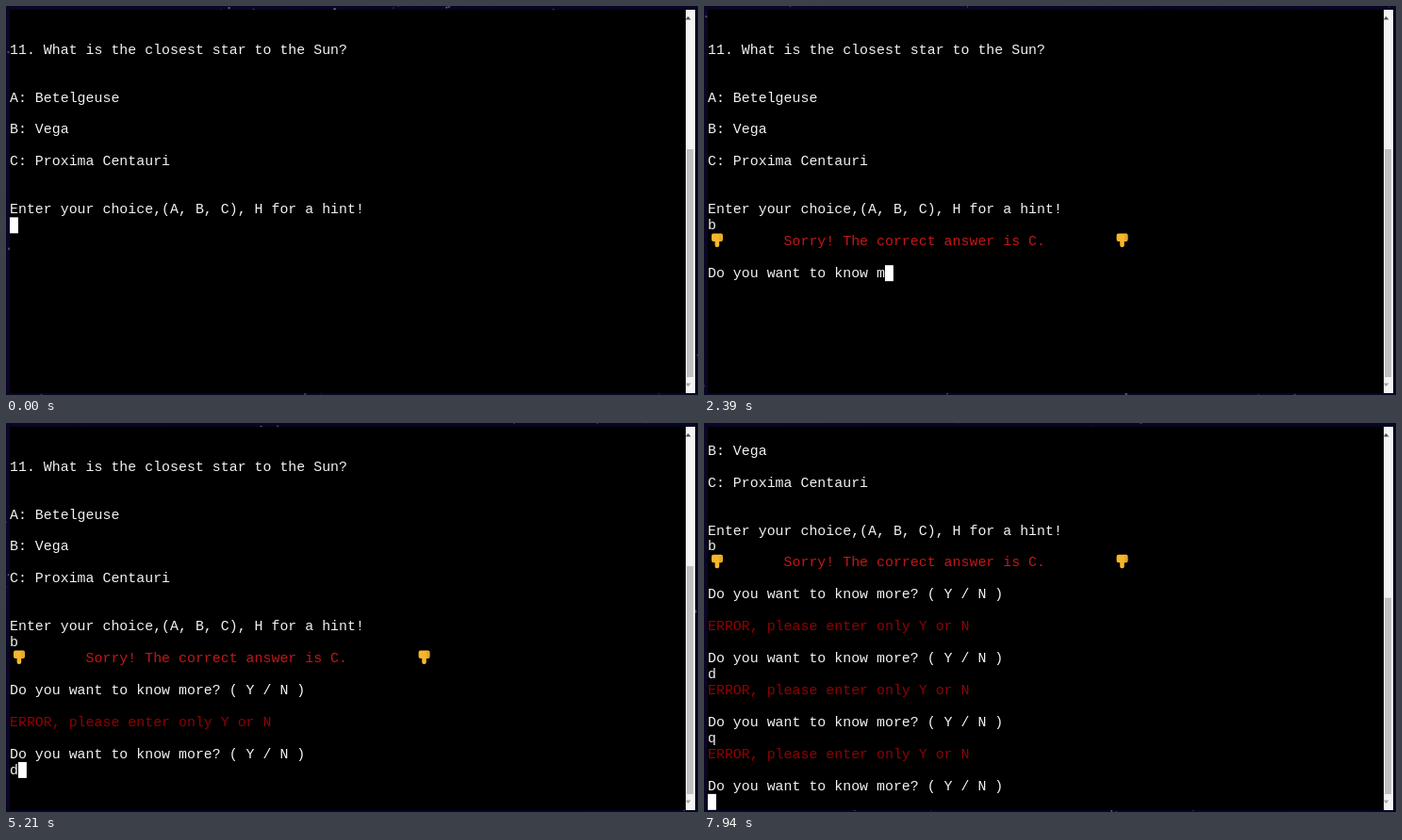
An HTML page with a canvas that plays this animation: 734x413 px, repeating every 8000 ms.

```html
<!DOCTYPE html>
<html lang="en">
<head>
<meta charset="utf-8">
<title>Quiz terminal</title>
<style>
html, body { margin: 0; width: 734px; height: 413px; overflow: hidden; background: #000; }
canvas { display: block; }
</style>
</head>
<body>
<canvas id="stage" width="734" height="413"></canvas>
<script>
const ctx = document.getElementById('stage').getContext('2d');
const W = 734, H = 413, LOOP = 8000;
const LEFT = 4, TOP = 4, CELL = 8.95, ROW = 16.95, ROWS = 24, CHAR_MS = 25;
const WHITE = '#f2f2f2', RED = '#c51616', DARK_RED = '#920000';
const ASK = 'Do you want to know more? ( Y / N )';
const ERROR = 'ERROR, please enter only Y or N';

const INTRO = ['', '', '11. What is the closest star to the Sun?', '', '',
  'A: Betelgeuse', '', 'B: Vega', '', 'C: Proxima Centauri', '', '',
  'Enter your choice,(A, B, C), H for a hint!'];

// key: when the answer is typed, enter: when it is sent
const TURNS = [
  { key: 1100, enter: 1850, answer: 'b', reply: 'Sorry! The correct answer is C.', color: RED, indent: 9, thumbs: true },
  { key: 3600, enter: 3680, answer: '', reply: ERROR, color: DARK_RED },
  { key: 4950, enter: 5275, answer: 'd', reply: ERROR, color: DARK_RED },
  { key: 6550, enter: 6870, answer: 'q', reply: ERROR, color: DARK_RED }
];

function screenLines(t) {
  const lines = INTRO.map(text => ({ text }));
  lines.push({ text: '' });
  for (const turn of TURNS) {
    if (t < turn.key) break;
    lines[lines.length - 1].text = turn.answer;
    if (t < turn.enter) break;
    lines.push({ text: turn.reply, color: turn.color, indent: turn.indent, thumbs: turn.thumbs });
    const count = Math.floor((t - turn.enter) / CHAR_MS);
    lines.push({ text: '' }, { text: ASK.slice(0, count) });
    if (count < ASK.length) break;
    lines.push({ text: '' });
  }
  return lines;
}

let seed = 11;
function rand() {
  seed = (seed * 16807) % 2147483647;
  return seed / 2147483647;
}
const stars = Array.from({ length: 900 }, () => ({
  angle: rand() * Math.PI * 2, dist: rand(), size: 0.5 + rand() * 1.1, light: 0.15 + rand() * 0.5
}));

function drawSky(t) {
  const g = ctx.createLinearGradient(0, 0, W, H);
  g.addColorStop(0, '#0b0526');
  g.addColorStop(0.5, '#090422');
  g.addColorStop(1, '#080525');
  ctx.fillStyle = g;
  ctx.fillRect(0, 0, W, H);
  for (const s of stars) {
    const d = (s.dist + t / 24000) % 1 * 430;
    ctx.fillStyle = `rgba(185,175,215,${s.light})`;
    ctx.beginPath();
    ctx.arc(W / 2 + Math.cos(s.angle) * d, H / 2 + Math.sin(s.angle) * d, s.size, 0, Math.PI * 2);
    ctx.fill();
  }
}

function triangle(x, y, dir, color) {
  ctx.fillStyle = color;
  ctx.beginPath();
  ctx.moveTo(x - 3, y + 1.5 * dir);
  ctx.lineTo(x + 3, y + 1.5 * dir);
  ctx.lineTo(x, y - 2 * dir);
  ctx.fill();
}

function drawScrollbar(scroll) {
  ctx.fillStyle = '#f3f3f3';
  ctx.fillRect(721, 4, 10, 407);
  ctx.fillStyle = '#c0c0c0';
  const y = 152 + scroll * 5.6;
  ctx.fillRect(722, y, 7, 394 - y);
  triangle(723.5, 13, 1, '#505050');
  triangle(723.5, 402, -1, '#a3a3a3');
}

function drawThumb(col, top) {
  const x = LEFT + col * CELL + 4, y = top + 0.2;
  ctx.fillStyle = '#f6b62c';
  ctx.beginPath();
  ctx.roundRect(x, y, 12, 8.5, 2);
  ctx.roundRect(x + 3.6, y + 5, 4.6, 9.5, 2);
  ctx.fill();
  ctx.fillStyle = '#c98a1e';
  for (let i = 0; i < 3; i++) ctx.fillRect(x + 8.4, y + 2 + i * 2.1, 3, 0.7);
}

function drawLine(line, top) {
  const indent = line.indent || 0;
  ctx.fillStyle = line.color || WHITE;
  [...line.text].forEach((c, i) => ctx.fillText(c, LEFT + (indent + i) * CELL, top + 12.8));
  if (line.thumbs) {
    drawThumb(0, top);
    drawThumb(48, top);
  }
}

function draw(t) {
  const lines = screenLines(t);
  const scroll = Math.max(0, lines.length - ROWS);
  drawSky(t);
  ctx.fillStyle = '#000';
  ctx.fillRect(LEFT, TOP, 717, 407);
  drawScrollbar(scroll);
  ctx.font = '14.92px "Liberation Mono", "Courier New", monospace';
  const rowTop = i => TOP + (i - scroll) * ROW;
  for (let i = scroll; i < lines.length; i++) drawLine(lines[i], rowTop(i));
  const last = lines.length - 1;
  ctx.fillStyle = '#fff';
  ctx.fillRect(LEFT + lines[last].text.length * CELL, rowTop(last), CELL, ROW);
}

function frame() {
  draw(performance.now() % LOOP);
  requestAnimationFrame(frame);
}
frame();
</script>
</body>
</html>
```
